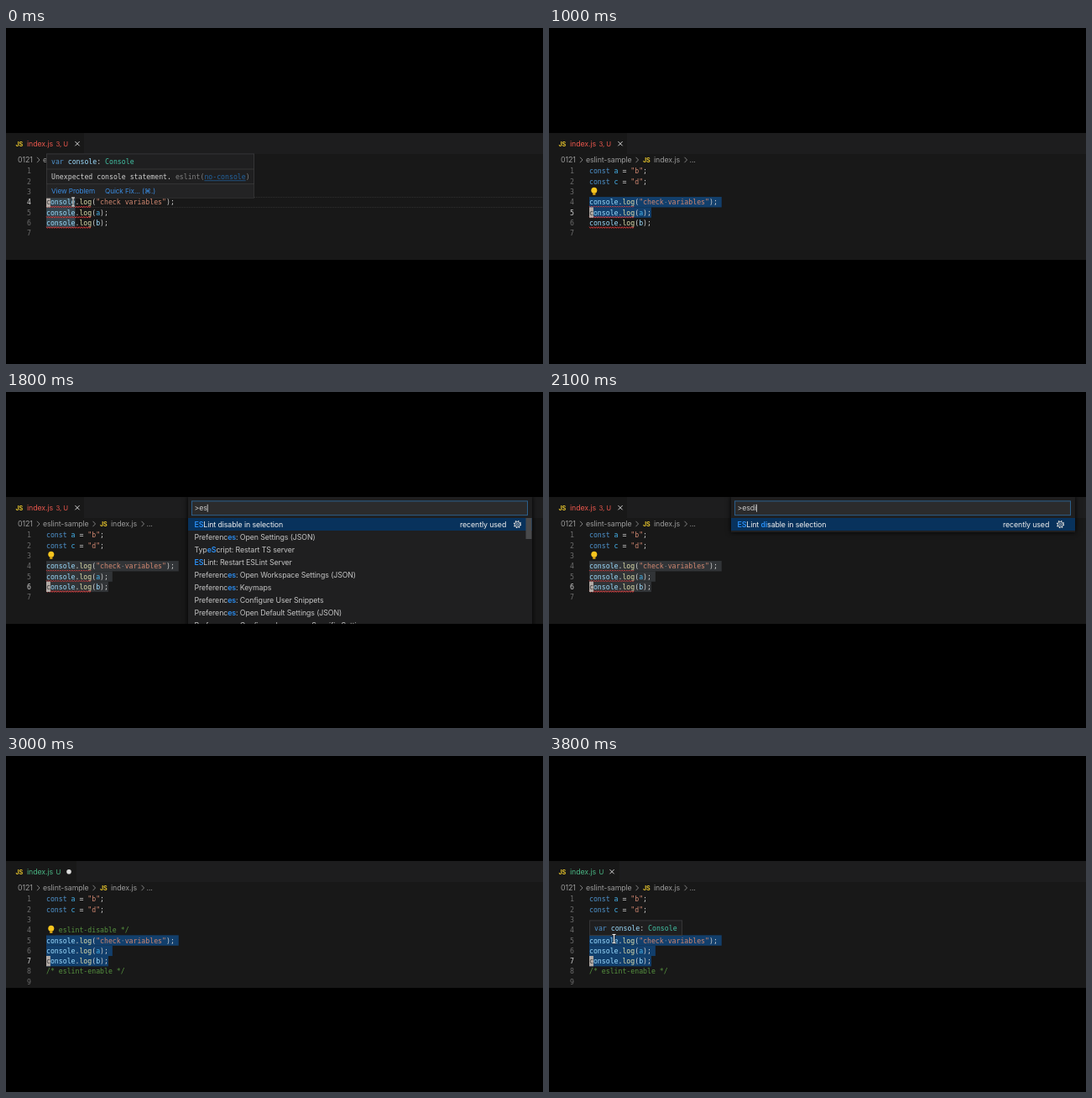
Write an HTML page with a canvas that moves like this. It is 640x400 px and loops after 3900 ms.

```html
<!DOCTYPE html>
<html lang="en">
<head>
<meta charset="utf-8">
<title>Disabling a lint rule in a selection</title>
<style>
  html, body { margin: 0; width: 640px; height: 400px; overflow: hidden; background: #000; }
  canvas { display: block; }
</style>
</head>
<body>
<canvas id="stage" width="640" height="400"></canvas>
<script>
const ctx = document.getElementById('stage').getContext('2d');
const LOOP = 3900, LINE = 12.3, LEFT = 48;
const MONO = '8.2px "DejaVu Sans Mono", monospace';
const SANS = '8.8px Inter, sans-serif';
const SANS_SMALL = '8.2px Inter, sans-serif';
const STRONG = '600 8.8px Inter, sans-serif';
const C = {
  editor: '#181818', bar: '#1d1d1e', plain: '#d0d0d0', keyword: '#4f94cf', constant: '#45b4ee',
  name: '#9cdcfe', call: '#dcdcaa', string: '#d08770', type: '#43c2a4', comment: '#56923f',
  dim: '#6c6c6c', crumb: '#9a9a9a', error: '#e8564c', added: '#49b583', yellow: '#e9c62c',
  link: '#3a8be0', hit: '#2a8ff5'
};

const declare = (name, value) => [
  'const ', C.keyword, name, C.constant, ' = ', C.plain, `"${value}"`, C.string, ';', C.plain];
const log = (arg, color) => [
  'console', C.name, '.', C.plain, 'log', C.call, '(', C.plain, arg, color, ');', C.plain];
const comment = text => [`/* ${text} */`, C.comment];

const declarations = [declare('a', 'b'), declare('c', 'd'), []];
const logs = [log('"check variables"', C.string), log('a', C.constant), log('b', C.name)];
const before = [...declarations, ...logs, []];
const after = [...declarations, comment('eslint-disable'), ...logs, comment('eslint-enable'), []];

const commands = [
  'ESLint disable in selection', 'Preferences: Open Settings (JSON)', 'TypeScript: Restart TS server',
  'ESLint: Restart ESLint Server', 'Preferences: Open Workspace Settings (JSON)', 'Preferences: Keymaps',
  'Preferences: Configure User Snippets', 'Preferences: Open Default Settings (JSON)',
  'Preferences: Configure Language Specific Settings'
];
// Spaces separate the pieces that are matched one after another.
const typing = [[1500, ''], [1700, 'e'], [1800, 'es'], [2000, 'es d'], [2100, 'es di'],
  [2300, 'es di i'], [2500, 'es di in']];

const lineY = n => 170.3 + LINE * (n - 1);

function rect(x, y, w, h, color) {
  ctx.fillStyle = color;
  ctx.fillRect(x, y, w, h);
}

function stroke(color, width, ...points) {
  ctx.strokeStyle = color;
  ctx.lineWidth = width;
  ctx.beginPath();
  points.forEach(([x, y]) => ctx.lineTo(x, y));
  ctx.stroke();
}

function disc(x, y, r, color) {
  ctx.fillStyle = color;
  ctx.beginPath();
  ctx.arc(x, y, r, 0, 7);
  ctx.fill();
}

// Draws text centred on y and returns its right end.
function text(str, x, y, color, font = SANS) {
  ctx.font = font;
  ctx.letterSpacing = font === MONO ? '0px' : '-0.1px';
  ctx.fillStyle = color;
  ctx.fillText(str, x, y + 3);
  return x + ctx.measureText(str).width;
}

function mono(parts, x, y) {
  for (let i = 0; i < parts.length; i += 2) x = text(parts[i], x, y, parts[i + 1], MONO);
  return x;
}

function charWidth() {
  ctx.font = MONO;
  ctx.letterSpacing = '0px';
  return ctx.measureText('0').width;
}

function cross(x, y) {
  stroke('#d0d0d0', 1, [x - 2.6, y - 2.6], [x + 2.6, y + 2.6]);
  stroke('#d0d0d0', 1, [x - 2.6, y + 2.6], [x + 2.6, y - 2.6]);
}

function jsIcon(x, y) {
  text('JS', x, y - 0.2, C.yellow, 'bold 7.2px Inter, sans-serif');
}

function header(clean, dirty) {
  const color = clean ? C.added : C.error, width = clean ? 84 : 93;
  rect(0, 125, 640, 25, C.bar);
  rect(0, 125, width, 25, C.editor);
  jsIcon(11.5, 138);
  text('index.js', 25, 137.7, color);
  text(clean ? 'U' : '3, U', 59.5, 137.7, color, '7.8px Inter, sans-serif');
  if (dirty) disc(75, 137.7, 2.8, '#dcdcdc');
  else cross(clean ? 75 : 85, 137.7);

  text('0121', 14, 157, C.crumb);
  text('eslint-sample', 44, 157, C.crumb);
  jsIcon(112, 157.3);
  text('index.js', 125, 157, C.crumb);
  text('...', 167.5, 157, C.crumb);
  for (const x of [37, 103.5, 161.5]) stroke(C.crumb, 0.8, [x, 153.8], [x + 3, 157], [x, 160.2]);
}

function bulb(y) {
  disc(53.8, y - 1, 3.5, '#f7c51e');
  rect(52.2, y + 2, 3.2, 2.6, '#d9a514');
}

function squiggle(y, width) {
  const points = [];
  for (let i = 0; i * 1.4 <= width; i++) points.push([LEFT + i * 1.4, y + (i % 2 ? 6.6 : 4.9)]);
  stroke('#e23c3c', 0.9, ...points);
}

function pointer(x, y) {
  const shape = [[[x - 2, y - 5], [x + 2, y - 5]], [[x, y - 5], [x, y + 5]], [[x - 2, y + 5], [x + 2, y + 5]]];
  shape.forEach(p => stroke('#222', 2.2, ...p));
  shape.forEach(p => stroke('#eee', 1.1, ...p));
}

function panel(x, y, w, h) {
  rect(x, y, w, h, '#1f1f20');
  ctx.strokeStyle = '#3b3b3c';
  ctx.lineWidth = 0.8;
  ctx.strokeRect(x + 0.4, y + 0.4, w - 0.8, h - 0.8);
}

const signature = y =>
  mono(['var ', C.keyword, 'console', C.name, ': ', C.plain, 'Console', C.type], 54, y);

function problemHover() {
  panel(48, 149.5, 248, 53);
  rect(48.8, 186, 246.4, 15.7, '#232324');
  for (const y of [168, 185.6]) stroke('#3b3b3c', 0.8, [48, y], [296, y]);
  signature(158.7);
  const x = mono(['Unexpected console statement. ', C.plain, 'eslint(', '#808080'], 54, 177.3);
  const end = mono(['no-console', '#23639f'], x, 177.3);
  stroke('#23639f', 0.7, [x, 181.7], [end, 181.7]);
  mono([')', '#808080'], end, 177.3);
  text('View Problem', 54, 194.3, C.link, SANS_SMALL);
  text('Quick Fix... (⌘.)', 118, 194.3, C.link, '8.2px Inter, "DejaVu Sans", sans-serif');
}

// Splits a command into [text, isHit] runs, or returns null if it does not match.
function match(command, pieces) {
  const runs = [];
  let pos = 0;
  for (const piece of pieces) {
    const at = command.toLowerCase().indexOf(piece, pos);
    if (at < 0) return null;
    runs.push([command.slice(pos, at), false], [command.slice(at, at + piece.length), true]);
    pos = at + piece.length;
  }
  return [...runs, [command.slice(pos), false]];
}

function gear(x, y) {
  ctx.strokeStyle = '#d8d8d8';
  for (const [r, width, dash] of [[3.9, 1.5, [1.53, 1.53]], [3.1, 0.9, []], [1.2, 0.8, []]]) {
    ctx.lineWidth = width;
    ctx.setLineDash(dash);
    ctx.beginPath();
    ctx.arc(x, y, r, 0, 2 * Math.PI);
    ctx.stroke();
  }
}

function palette(query, caret) {
  const rows = commands.map(c => match(c, query.split(' ').filter(Boolean))).filter(Boolean);
  const full = rows.length > 7;
  ctx.save();
  ctx.shadowColor = '#000';
  ctx.shadowBlur = 6;
  rect(217, 124, 410, full ? 160 : 28 + rows.length * 15, '#1f1f20');
  ctx.restore();
  rect(221, 129.5, 401, 17.5, '#2b2b2c');
  ctx.strokeStyle = '#2c6596';
  ctx.lineWidth = 0.9;
  ctx.strokeRect(221.5, 129.9, 400, 16.8);
  const end = text('>' + query.replaceAll(' ', ''), 224.5, 138.3, '#c8c8c8');
  if (caret) rect(end, 133.8, 0.8, 9, '#ddd');

  rect(217, 150, 410, 15, '#08325c');
  rows.forEach((runs, i) => {
    let x = 224.5;
    for (const [str, hit] of runs) {
      if (str) x = text(str, x, 157.7 + i * 15.05, hit ? C.hit : i ? '#c4c4c4' : '#f0f0f0', hit ? STRONG : SANS);
    }
  });
  text('recently used', 541, 157.7, '#f0f0f0');
  gear(609.5, 157.6);
  if (full) rect(619.5, 150, 7, 25, '#48494b');
}

function render(t) {
  const edited = t >= 2800, clean = t >= 2900;
  const query = t < 2700 ? typing.findLast(([start]) => t >= start) : undefined;
  const selected = t < 800 ? 0 : t < 1000 ? 1 : t < 1200 ? 2 : 3;
  const first = edited ? 5 : 4;
  const current = first + Math.max(selected - 1, 0);
  const cw = charWidth();

  rect(0, 0, 640, 400, '#000');
  ctx.save();
  ctx.beginPath();
  ctx.rect(0, 125, 640, 151);
  ctx.clip();
  rect(0, 125, 640, 151, C.editor);
  header(clean, edited && t < 3300);

  if (!selected) {
    ctx.setLineDash([1, 1]);
    for (const y of [201.5, 213.5]) stroke('#303030', 1, [LEFT, y], [640, y]);
    ctx.setLineDash([]);
    for (let n = 4; n < 7; n++) rect(LEFT, lineY(n) - 6.1, cw * 7, LINE - 0.3, '#34444d');
  }

  (edited ? after : before).forEach((parts, i) => {
    const n = i + 1, y = lineY(n);
    const length = parts.reduce((sum, part, k) => sum + (k % 2 ? 0 : part.length), 0);
    if (n >= first && n < first + selected) {
      const tail = n < current ? 1 : 0;
      rect(LEFT, y - 6.15, (length + tail) * cw, LINE + 0.1, query ? '#313437' : '#123f6c');
      if (n === first) disc(LEFT + 18.5 * cw, y + 0.3, 0.6, '#8c9aa5');
    }
    text(String(n), 30 - cw, y, n === current ? '#d0d0d0' : C.dim, MONO);
    mono(parts, LEFT, y);
    if (!clean && n >= first && n < first + 3) squiggle(y, 11 * cw);
  });

  if (t < 500 || t >= 800) {
    const y = lineY(current);
    rect(LEFT, y - 6.1, cw, LINE, '#b3aba6');
    mono(['c', '#3a3a3a'], LEFT, y);
  }

  if (edited) {
    rect(LEFT, lineY(4) - 6, 11, 12, C.editor);
    bulb(206.3);
  } else {
    bulb(194.2);
  }

  if (t < 300) {
    problemHover();
    pointer(80, 207);
  }
  if (query) palette(query[1], (t + 200) % 1000 < 500);
  if (t >= 3600) {
    panel(48, 195.5, 111, 18.5);
    signature(205);
  }
  if (t >= 3400) pointer(77.5, 217.5);
  ctx.restore();
}

function tick() {
  render(Math.floor(performance.now() % LOOP / 100) * 100);
  requestAnimationFrame(tick);
}
tick();
</script>
</body>
</html>
```
